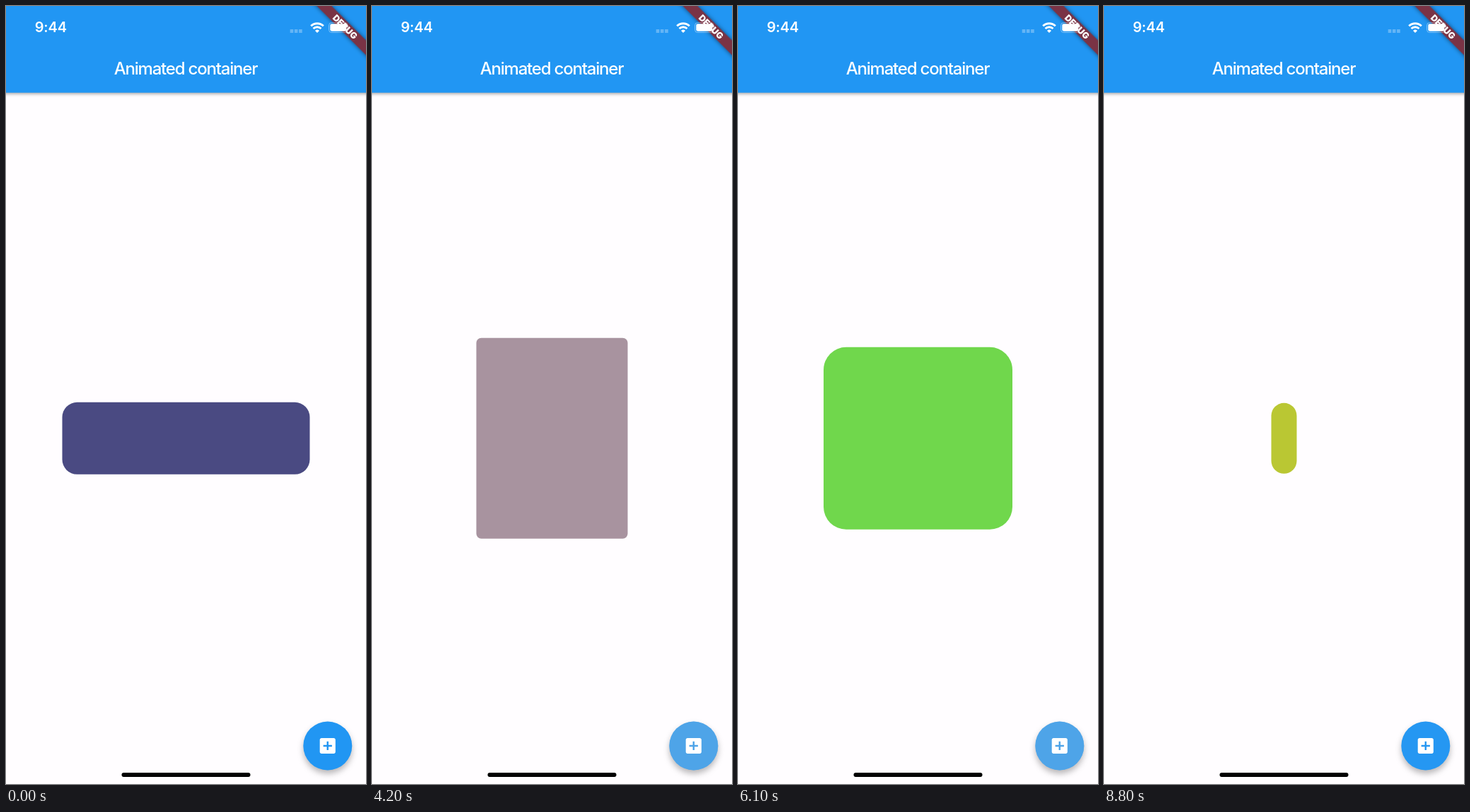
These frames come from a looping animation (509 px wide and 1101 px high, 8900 ms). An HTML page:

```html
<!DOCTYPE html>
<html lang="en">
<head>
<meta charset="utf-8">
<title>Animated container</title>
<style>
  html, body { margin: 0; width: 100%; height: 100%; overflow: hidden; background: #fffdff; }
  svg { display: block; width: 509px; height: 1101px; }
  text { font-family: Inter, Roboto, sans-serif; fill: #fff; text-anchor: middle; }
  .bar { filter: drop-shadow(0 2px 2px rgba(0, 0, 0, .32)); }
  .fab { filter: drop-shadow(0 5px 4px rgba(0, 0, 0, .28)); }
  .ribbon { filter: drop-shadow(0 0 3px rgba(0, 0, 0, .5)); }
</style>
</head>
<body>
<svg viewBox="0 0 509 1101">
  <clipPath id="disc"><circle cx="454.8" cy="1047" r="34.5"/></clipPath>

  <rect id="box"/>

  <rect class="bar" x="-10" y="-10" width="529" height="132.7" fill="#2196f3"/>
  <text x="254" y="97" font-size="24" font-weight="500" letter-spacing="-1.2">Animated container</text>
  <text x="63.3" y="37.2" font-size="20" font-weight="600" letter-spacing="-.2">9:44</text>

  <circle class="fab" cx="454.8" cy="1047" r="34.5" fill="#2196f3"/>
  <circle id="ripple" cx="451" cy="1048" fill="#c6c6c6" clip-path="url(#disc)"/>
  <path transform="translate(440 1032.2) scale(1.2295)" fill="#fff" d="M19 3H5c-1.11 0-2 .9-2 2v14c0 1.1.89 2 2 2h14c1.1 0 2-.9 2-2V5c0-1.1-.9-2-2-2zm-2 10h-4v4h-2v-4H7v-2h4V7h2v4h4v2z"/>

  <g transform="translate(509 0) rotate(45)">
    <rect class="ribbon" x="-60" y="34.4" width="120" height="14.8" fill="#7a3345"/>
    <text x="0" y="46.3" font-size="12.4" font-weight="900">DEBUG</text>
  </g>

  <g fill="#fff">
    <path d="M404 35.5h18" fill="none" stroke="#fff" stroke-opacity=".3" stroke-width="5" stroke-dasharray="4.6 1.6" transform="translate(-2.3 0) scale(1 1)" pathLength="18"/>
    <g fill="none" stroke="#fff" stroke-width="2.9">
      <path d="M431.2 28.3a12.7 12.7 0 0 1 17.6 0"/>
      <path d="M434.5 32a8 8 0 0 1 11 0"/>
    </g>
    <path d="M440 38l-3-3.1a4.3 4.3 0 0 1 6 0z"/>
    <rect x="456.5" y="23.5" width="26.5" height="14" rx="4" fill="none" stroke="#fff" stroke-opacity=".4"/>
    <rect x="458.3" y="25.3" width="23" height="10.4" rx="2.4"/>
    <path d="M484.5 28.2a2.4 2.4 0 0 1 0 4.6z" fill-opacity=".45"/>
  </g>

  <rect x="163.5" y="1085" width="182" height="6" rx="3" fill="#000"/>
</svg>
<script>
const LOOP = 8900, STEP = 100;
const box = document.getElementById('box'), ripple = document.getElementById('ripple');

// tap time, width, height, corner radius, r, g, b
const states = [
  [-1000, 350, 102, 21, 74, 74, 130],
  [2140, 340, 290, 6, 85, 135, 215],
  [2980, 272, 356, 20, 137, 101, 131],
  [3540, 196, 300, 4, 160, 155, 185],
  [4110, 268, 236, 16, 192, 123, 81],
  [4580, 160, 170, 16, 90, 160, 120],
  [5080, 293, 104, 24, 10, 213, 63],
  [5540, 278, 230, 30, 70, 212, 66],
  [6010, 234, 342, 38, 238, 224, 106],
  [6540, 190, 260, 40, 120, 150, 200],
  [7040, 260, 150, 20, 190, 110, 120],
  [7480, 317, 182, 32, 129, 103, 94],
  [7980, 150, 140, 25, 150, 150, 70],
  [8530, 36, 100, 18, 186, 199, 51]
];

const clamp = x => Math.min(1, Math.max(0, x));
const set = (el, attrs) => { for (const k in attrs) el.setAttribute(k, attrs[k]); };

function draw(now) {
  const t = Math.floor(now % LOOP / STEP) * STEP;
  const i = states.findLastIndex(s => s[0] <= t);
  const to = states[i], from = states[Math.max(0, i - 1)];
  const since = t - to[0];

  // the box starts to move when the finger lifts, 60 ms after the tap
  const p = clamp((since - 60) / 120);
  const [, w, h, rx, r, g, b] = from.map((v, k) => v + (to[k] - v) * p);
  set(box, { x: 254.5 - w / 2, y: 611.8 - h / 2, width: w, height: h, rx, fill: `rgb(${r},${g},${b})` });

  const fade = 1 - clamp((since - 130) / 200);
  set(ripple, { r: Math.min(45, 20 * (since / 60) ** 1.7), opacity: .27 * fade * fade });
}

function loop() {
  draw(performance.now());
  requestAnimationFrame(loop);
}
loop();
</script>
</body>
</html>
```
